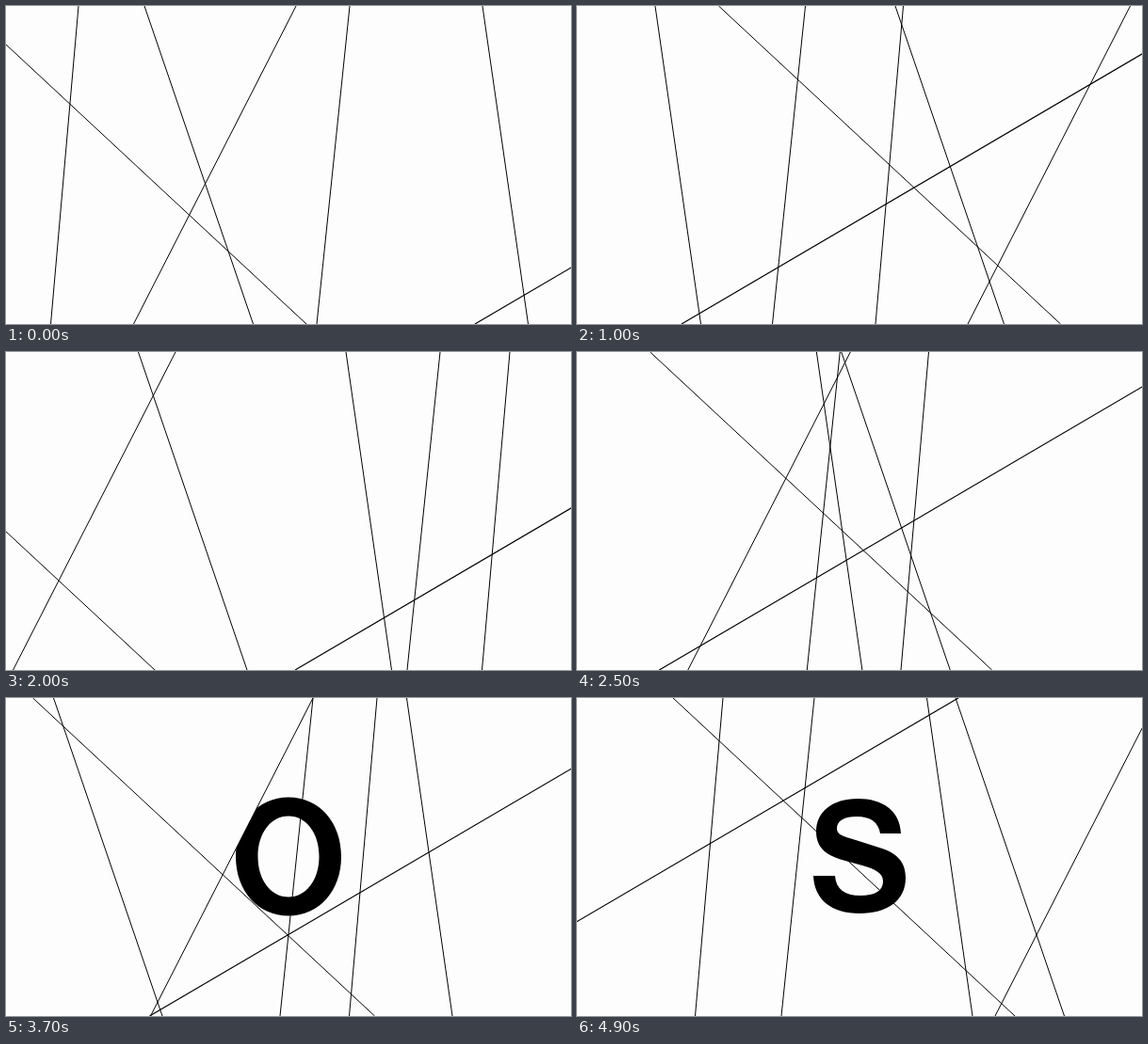
An HTML page with a canvas for the animation above (5 s loop, 600 by 338 pixels).

```html
<!DOCTYPE html>
<html lang="en">
<head>
<meta charset="utf-8">
<title>Lines and letters</title>
<style>
html, body { margin: 0; width: 100%; height: 100%; overflow: hidden; background: #fdfdfd; }
canvas { display: block; width: 600px; height: 338px; }
</style>
</head>
<body>
<canvas id="stage" width="600" height="338"></canvas>
<script>
const W = 600, H = 338, LOOP = 5000, STEP = 100;
const ctx = document.getElementById('stage').getContext('2d');

// Each line keeps its slant (dx from top to bottom) and drifts sideways.
const times = [0, 1, 2, 3, 3.7, 4.4, 4.9];
const lines = [
  { dx: -29.5, x: [77, 346.5, 535, 208.5, 394, 296, 155] },
  { dx: -35, x: [365, 242.5, 461, 96, 326, 328.5, 252] },
  { dx: 48.5, x: [506, 83, 361, 149, 425.5, 456, 371.5] },
  { dx: 115.5, x: [147, 338, 140.5, 400, 50.5, 157.5, 402] },
  { dx: -172.5, x: [308, 587.5, 180, 440.5, 326, 438.5, 616.5] },
  { dx: 363, x: [-44, 150.5, -205, 367.5, 28.5, 8.5, 102] },
  { dx: -576, x: [1074, 687, 883, 450.5, 728.5, 535, 405], width: 1.2 }
];
const edgeO = lines[4], edgeS = lines[6];

function ovalPath(rx, ry) {
  const k = 0.58, cx = 300, cy = 168.5;
  const p = (u, v) => `${cx + u * rx},${cy + v * ry} `;
  return 'M' + p(0, -1) +
    'C' + p(k, -1) + p(1, -k) + p(1, 0) +
    'C' + p(1, k) + p(k, 1) + p(0, 1) +
    'C' + p(-k, 1) + p(-1, k) + p(-1, 0) +
    'C' + p(-1, -k) + p(-k, -1) + p(0, -1) + 'Z';
}

const letterO = new Path2D(ovalPath(56, 63) + ovalPath(32.5, 43));
const letterS = new Path2D(`M344,144 C343,120 325,107 298,107 C271,107 254,121 254,142
  C254,160 266,168 285,173 L303,178 C317,182 325,186 325,195 C325,205 316,210 301,210
  C284,210 275,203 274,189 L251,189 C252,214 270,229 300,229 C330,229 349,215 349,191
  C349,173 338,164 321,159 L296,151 C282,147 276,145 276,139 C276,130 284,126 297,126
  C312,126 320,132 322,144 Z`);

// Smooth curve through the key positions
function place(x, t) {
  const last = times.length - 1;
  let i = 0;
  while (i < last - 1 && t >= times[i + 1]) i++;
  const slope = j => {
    const a = Math.max(j - 1, 0), b = Math.min(j + 1, last);
    return (x[b] - x[a]) / (times[b] - times[a]);
  };
  const d = times[i + 1] - times[i];
  const u = Math.min((t - times[i]) / d, 1), v = 1 - u;
  return v * v * (1 + 2 * u) * x[i] + u * u * (3 - 2 * u) * x[i + 1] +
    d * u * v * (v * slope(i) - u * slope(i + 1));
}

function clipBeside(line, t, side) {
  const x = place(line.x, t);
  ctx.beginPath();
  ctx.moveTo(x, 0);
  ctx.lineTo(x + line.dx, H);
  ctx.lineTo(side * 2000, H);
  ctx.lineTo(side * 2000, 0);
  ctx.clip();
}

function drawLetter(path, t, clips) {
  ctx.save();
  for (const [line, side] of clips) clipBeside(line, t, side);
  ctx.fill(path, 'evenodd');
  ctx.restore();
}

function draw(t) {
  ctx.fillStyle = '#fdfdfd';
  ctx.fillRect(0, 0, W, H);
  ctx.fillStyle = ctx.strokeStyle = '#000';
  if (t > 3 && t < 4.4) drawLetter(letterO, t, [[edgeO, 1]]);
  if (t > 3.7) drawLetter(letterS, t, [[edgeS, 1], [edgeO, -1]]);
  for (const line of lines) {
    const x = place(line.x, t);
    ctx.lineWidth = line.width || 1;
    ctx.beginPath();
    ctx.moveTo(x, 0);
    ctx.lineTo(x + line.dx, H);
    ctx.stroke();
  }
}

const start = performance.now();
function frame() {
  const ms = (performance.now() - start) % LOOP;
  draw(Math.floor(ms / STEP) * STEP / 1000);
  requestAnimationFrame(frame);
}
frame();
</script>
</body>
</html>
```
